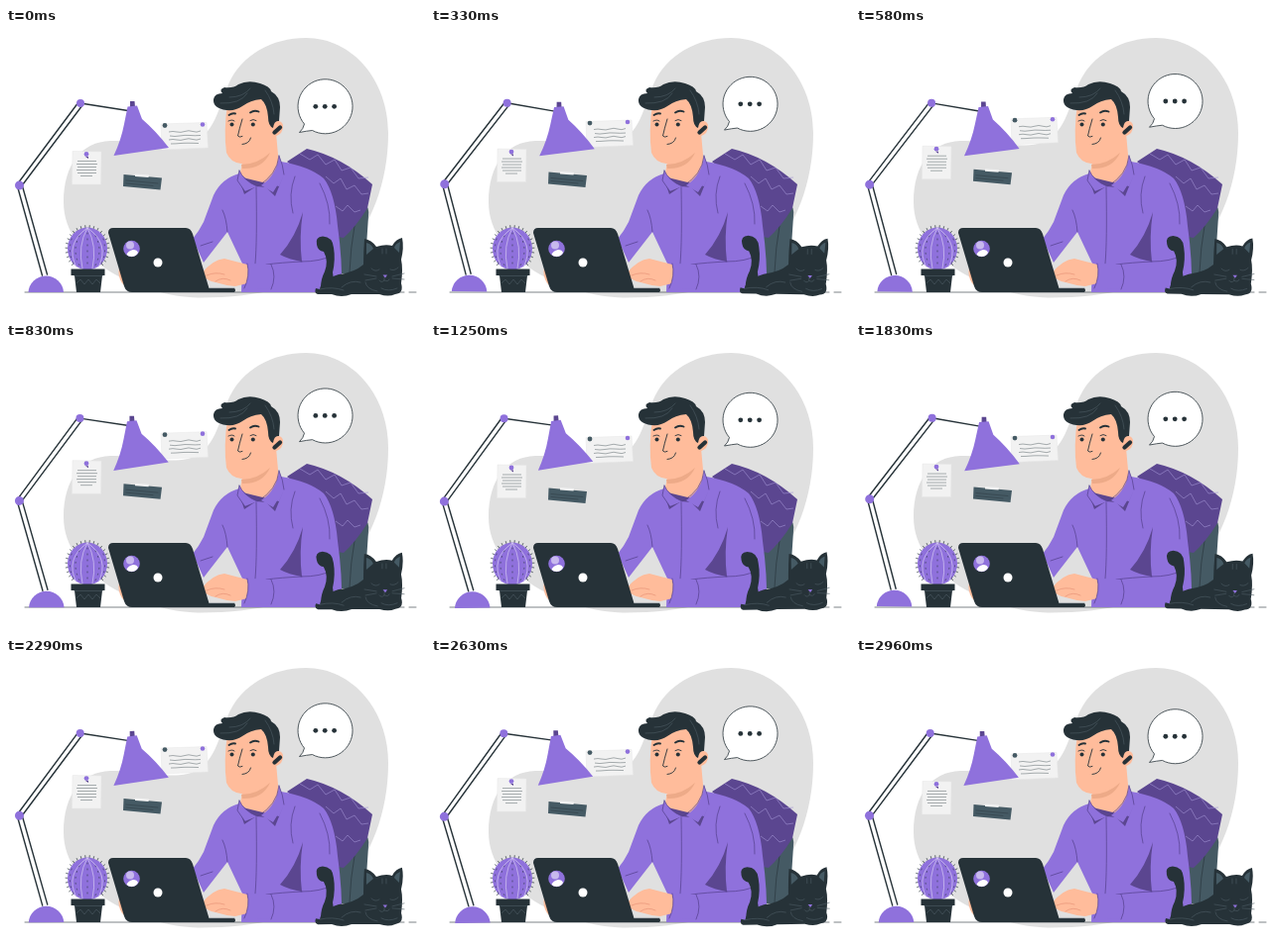
Write an HTML page that moves like this. It is 422 by 290 pixels and loops after 3 s.

```html
<!DOCTYPE html>
<html lang="en">
<head>
<meta charset="utf-8">
<title>Working at a desk</title>
<style>
html, body { margin: 0; width: 100%; height: 100%; overflow: hidden; background: #fff; }
svg { display: block; width: 100vw; height: 100vh; }
.ink { fill: #263238; }
.lilac { fill: #8f71dc; }
.plum { fill: #5b4690; }
.slate { fill: #455a64; }
.skin { fill: #ffbc9b; }
.paper { fill: #f2f2f2; stroke: #e6e6e6; stroke-width: .5; }
.line { fill: none; stroke: #263238; stroke-linecap: round; stroke-linejoin: round; }
.text { fill: none; stroke: #6f797d; stroke-width: .6; }
.fold { fill: none; stroke: #54408c; stroke-width: .7; stroke-linecap: round; }
.knit { fill: none; stroke: #a292d3; stroke-width: .6; }
.fur { fill: none; stroke: #4d5d65; stroke-width: .6; stroke-linecap: round; }
.crease { fill: none; stroke: #e28e72; stroke-width: .6; stroke-linecap: round; }
</style>
</head>
<body>
<svg viewBox="0 0 422 290">
  <path fill="#e0e0e0" d="M302 10C350 10 385 54 385 106C385 157 367 201 339 232C308 261 250 273 193 272.500C139 271 58 236 58 176C58 138 76 115 105 114C134 113 158 122 183 117C211 110 214 79 224 57C237 27 268 10 302 10Z"/>
  <path class="line" stroke-width=".6" d="M19 267H401M406 267H413"/>

  <g class="float">
    <path class="paper" d="M67 124.500L96 125L95.500 158L66.500 158Z"/>
    <path class="text" d="M72 134.500H91M71 137.500H92M72 140.500H91M71 143.500H91M72 146.500H91M75 149.500H87"/>
    <circle class="lilac" cx="81" cy="127.500" r="2.400"/>
    <path class="plum" d="M80 130l3 0l0 2z"/>
    <path class="paper" d="M156 97L202 95.500L203.500 121L157 123Z"/>
    <path class="text" d="M164 105q4-1 8 0t8-.5t8 0t8-.5M165 109q5 1 10 0t10-.5t11 0M164 113q4-1 8 0t8-.5t8 0t8-.5M166 117q5 0 10-.5t18 0"/>
    <circle class="slate" cx="160" cy="98.500" r="2.400"/>
    <circle class="lilac" cx="198" cy="97.500" r="2.300"/>
    <path class="slate" d="M118.500 148L157 151.500L155.500 163.500L118 160Z"/>
    <path fill="#f2f2f2" d="M130 147.500L144 148.500L143.500 151L130 150Z"/>
    <path class="line" stroke-width=".4" d="M121 154L153 157M121 157L148 159.500"/>
  </g>

  <g class="sway" data-pivot="87 170">
    <path class="lilac" d="M22.500 267A17.800 17.800 0 0 1 58 267Z"/>
    <path class="line" stroke-width="1.400" d="M36.500 250L11.500 160M41.500 249L16 158M12 157L73 75M15.500 160L77 78M75 76L126 84"/>
    <circle class="lilac" cx="13.500" cy="159" r="4.500"/>
    <circle class="lilac" cx="75" cy="76" r="4"/>
    <path class="plum" d="M125 74h4.500l.5 6h-5z"/>
    <path class="lilac" d="M122.500 79.500L132 78.500L137 92Q151 104 164 121L108.500 129Q116 113 119 97Z"/>
  </g>

  <!-- chair and throw -->
  <path class="slate" d="M330 178H361Q366 180 365 190L362 236Q361 248 351 248H334Z"/>
  <path class="line" stroke-width=".6" d="M351 200Q347 222 346 247"/>
  <path class="plum" d="M283 135L303 122Q338 130 369 158L364 182Q353 200 340 212L328 210L300 150Z"/>
  <path class="knit" d="M296 127l10 6l8-5l8 10l9-5l7 11l9-3l8 11l10-1M322 150l8 7l7-5l6 11l8-4l7 9l7-1M332 180l7 5l5-6l7 7l6-2"/>

  <!-- person -->
  <path class="skin" d="M239 130L235 152L240 160L254 161L276 150L272 106Z"/>
  <path fill="#edaa88" d="M237 138Q253 138 266 126Q258 143 238 142Z"/>
  <path class="lilac" d="M235 147Q217 152 209 169L199 196Q194 206 188 213L199 237L223 206L238 238L237 267H338Q339 235 334 200Q331 166 320 152Q306 140 277 135L273 149Q262 159 252 160Z"/>
  <path class="plum" d="M299 186Q292 211 276 229Q285 234 298 236Q295 211 299 186Z"/>
  <path class="plum" d="M234 150L240 168L252 160L262 161L271 170L280 148L275 160Z"/>
  <path class="lilac" d="M235 144L233 154L240.500 165L253 160Q239 154 235 144ZM275 129Q273 148 257 159L269 166L280 148Q279 138 275 129Z"/>
  <path class="fold" d="M235 144Q239 154 253 160Q273 149 275 129M235 144L233 154L240.500 165M280 148Q279 138 275 129M252 161Q253 215 251 238M291 150Q284 168 289 187M223 206Q222 192 218 184M196 220L208 216M316 157Q327 178 326 198M297 236Q318 236 327 230M262 239Q277 237 298 236"/>
  <path class="skin" d="M197 248Q208 234 220 233L243 239Q247 248 243 258L231 261Q220 260 211 257Q202 256 197 248Z"/>
  <path class="crease" d="M202 250Q211 246 220 249M211 256Q218 251 226 255"/>
  <path class="lilac" d="M243 238L267 239Q273 251 267 264L240 263Q246 250 243 238Z"/>
  <path class="fold" d="M243 238Q246 250 240 263M267 239Q273 251 267 264"/>

  <path class="skin" d="M223 77Q219 104 222 126Q226 136 237 137Q256 137 268 119L270 110Q280 107 279 98Q277 92 270 95L266 69Q242 66 223 77Z"/>
  <path class="ink" d="M222 83Q208 81 209 72Q210 66 218 66Q214 62 220 60Q229 61 234 57Q244 52 256 56Q266 59 267 64Q276 69 276 80L275 94Q270 93 269 101Q264 99 264 90Q263 77 257 72Q246 73 238 79Q231 84 222 83Z"/>
  <path class="fur" d="M216 76Q236 77 243 66M225 70Q239 70 246 61M261 63Q269 74 270 87"/>
  <path class="line" stroke-width="1.900" d="M224.500 88Q228 85.500 231 86.500M246 85.500Q250 82.500 254.500 84.500"/>
  <circle class="ink" cx="227.500" cy="97.500" r="2"/>
  <circle class="ink" cx="248.800" cy="97.500" r="2"/>
  <path class="line" stroke-width=".9" d="M224 94Q228 92 230 94M246 93.500Q249 91.500 252 93.500M238 92Q235 102 233.500 109Q235 111 238 109.500M238 117.500Q245 117 246.500 111"/>
  <path class="line" stroke-width="4.300" d="M270.500 105.500L276 100.500"/>

  <!-- laptop -->
  <path class="skin" d="M114 242Q112 250 117 258L126 266V246Z"/>
  <path class="ink" d="M103 207Q103 202 108 202H181Q186 202 188 208L204.500 263H230Q232 265 230 267H127Q121 267 119 261Z"/>
  <path class="fur" d="M205 263H230"/>
  <circle fill="#fff" cx="153" cy="237" r="4.500"/>
  <circle class="lilac" cx="126.500" cy="223" r="8.300"/>
  <circle fill="#c8b9ee" cx="125" cy="219.500" r="4"/>
  <path fill="#fff" d="M121.500 229Q123 225 128 224Q132 224 133 227Q131 231 126.500 231Q123 231 121.500 229Z"/>

  <!-- cactus -->
  <path id="spines" class="line" stroke-width=".7"/>
  <ellipse class="lilac" cx="82" cy="223" rx="20" ry="21.500"/>
  <path fill="none" stroke="#d6caf2" stroke-width=".7" d="M82 202Q59 218 71 242M82 202Q72 220 77 243M82 202Q92 220 87 243M82 202Q105 218 93 242"/>
  <path class="line" stroke-width=".6" stroke-dasharray="1 5" d="M82 207V242M66 213Q62 227 68 238M98 213Q102 227 96 238M74 210Q66 224 74 240M90 210Q98 224 90 240"/>
  <path class="ink" d="M65.500 243.500H99.500V250H97L95 267H71L69 250H65.500Z"/>
  <path class="fur" d="M69 250.500H97M71 258l4-4l4 5l4-5l4 5l4-5l4 4"/>

  <g class="sway" data-pivot="356 241">
    <path class="ink" d="M313 219Q311 211 319 210.500Q329 211 330 222Q332 234 329 247L331 262H317Q317 254 321 246Q325 235 320 226Q314 225 313 219Z"/>
    <path class="ink" d="M316 264Q317 255 335 249Q351 247 360 239Q360 226 361 213Q368 214 373 221Q382 218 389 220Q393 213 399 212Q401 222 398 234Q400 243 398 258Q401 268 392 269Q385 272 376 269H348Q338 273 328 269H314Q310 268 312 263Z"/>
    <path class="slate" d="M363 217Q368 218 370 223L363 229ZM397 216Q392 218 391 222L396 227Z"/>
    <path class="fur" d="M368 243Q372 247 376 244M387 244Q391 246 395 242M381 252V255Q378 258 376 255M381 255Q385 257 386 254M373 251L361 249M373 253L362 255M389 251L401 248M389 253L401 254M379 223V228M383 223V228M316 264Q329 261 340 265M338 262Q347 254 357 257M362 257Q363 264 374 266M378 263Q385 267 394 263"/>
    <path class="lilac" d="M379.500 249.500H384L382 252.500Z"/>
  </g>

  <g class="float">
    <path fill="#fff" stroke="#263238" stroke-width=".8" stroke-linejoin="round" d="M300.500 97A27.500 27.500 0 1 1 308.500 103.500Q303 104 295.500 105.500Q299.500 102 300.500 97Z"/>
    <g class="ink">
      <circle cx="311.800" cy="79.300" r="2.400"/>
      <circle cx="321.200" cy="79.300" r="2.400"/>
      <circle cx="330.600" cy="79.300" r="2.400"/>
    </g>
  </g>
</svg>
<script>
const all = name => [...document.querySelectorAll(name)];
const floaters = all('.float'), swayers = all('.sway');

let spines = '';
for (let i = 0; i < 24; i++) {
  const a = Math.PI * (0.75 + 1.5 * i / 23), x = Math.cos(a), y = Math.sin(a);
  spines += `M${82 + 19 * x} ${223 + 20 * y}L${82 + 22 * x} ${223 + 23.5 * y}`;
}
document.getElementById('spines').setAttribute('d', spines);

// Both motions repeat every 1500 ms, twice per loop.
function draw(now) {
  const phase = now % 3000 / 1500 * 2 * Math.PI;
  const lift = 3 * (Math.cos(phase) - 1), turn = Math.sin(phase);
  for (const g of floaters) g.setAttribute('transform', `translate(0 ${lift})`);
  for (const g of swayers) g.setAttribute('transform', `rotate(${turn} ${g.dataset.pivot})`);
}
const start = performance.now();
function tick() {
  draw(performance.now() - start);
  requestAnimationFrame(tick);
}
tick();
</script>
</body>
</html>
```
